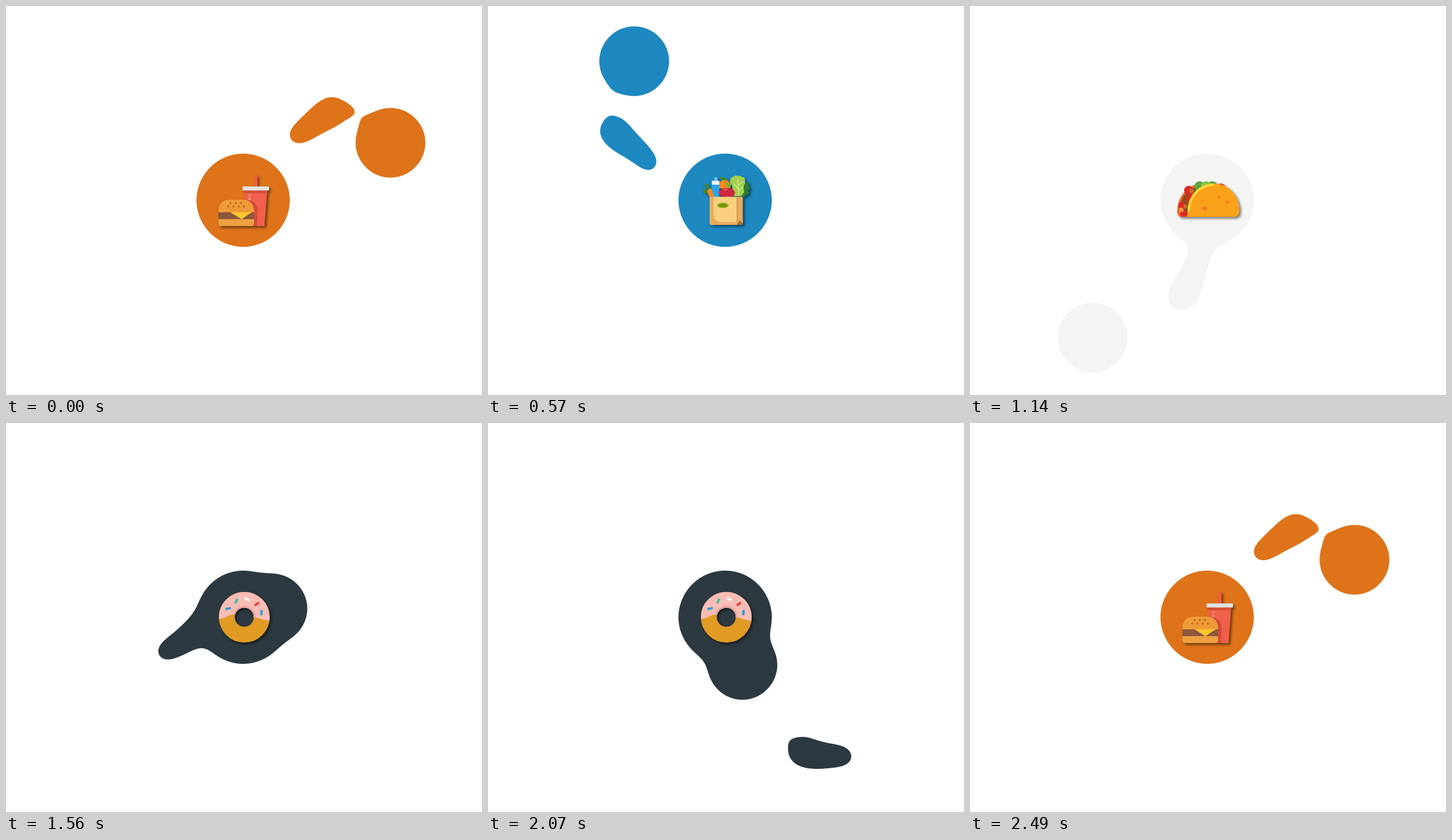
An HTML page for the animation above (2.52 s loop, 827 by 677 pixels).

```html
<!DOCTYPE html>
<html lang="en">
<head>
<meta charset="utf-8">
<title>Food loop</title>
<style>
html, body { margin: 0; width: 100%; height: 100%; overflow: hidden; background: #fff; }
svg { display: block; width: 100%; height: 100%; }
.icon { display: none; filter: drop-shadow(3px 3px 2px rgba(0, 0, 0, .5)); }
.icon.on { display: inline; }
</style>
</head>
<body>
<svg viewBox="0 0 827 677">
  <defs>
    <filter id="goo" filterUnits="userSpaceOnUse" x="0" y="0" width="827" height="677" color-interpolation-filters="sRGB">
      <feGaussianBlur stdDeviation="14"/>
      <feColorMatrix values="1 0 0 0 0  0 1 0 0 0  0 0 1 0 0  0 0 0 36 -13.9"/>
    </filter>
    <clipPath id="icing">
      <path d="M360 285H470V345Q452 345 440 340Q428 337 414 338Q396 329 384 337Q376 342 360 342Z"/>
    </clipPath>
    <clipPath id="shell">
      <path d="M378 358C378 329 399 309 424 309C450 309 468 331 468 356Q468 367 459 367H378Z"/>
    </clipPath>
  </defs>

  <g id="blob" filter="url(#goo)"><circle cx="412" cy="338" r="78.7"/></g>

  <g class="icon">
    <path fill="#f05a42" d="M432 294h5v20h-5z"/>
    <path fill="#f0604a" d="M414 320h40l-5 63h-31z"/>
    <path fill="#d64f3b" d="M414 321h39l-1 5h-37z"/>
    <path fill="#d24b3b" d="M420 337q14 3 17 14v9q-2 3 0 6q-2 3 0 6q-2 4 0 11h-17z"/>
    <path fill="#f79482" d="M421 328h4v3h-4zM421 334h4v4h-4z"/>
    <path fill="#e1e1df" d="M411 314h46v7h-46z"/>
    <path fill="#ef9a38" d="M369 360v-4q1-19 22-19h18q21 0 22 19v4z"/>
    <path fill="#8d583c" d="M369 359h62v12h-62z"/>
    <path fill="#fdc82e" d="M390 359h37l-18 12z"/>
    <path fill="#eda03f" d="M369 371h62v7q0 5-5 5h-52q-5 0-5-5z"/>
    <path stroke="#b8661f" stroke-width="3.4" stroke-linecap="round" d="M390 343h.1m9 0h.1m9 0h.1M386 349h.1m9 0h.1m9 0h.1m9 0h.1"/>
  </g>

  <g class="icon">
    <path stroke="#4c8a22" stroke-width="4" stroke-linecap="round" d="M387 322l-12-1M388 322l-10-11M386 323l-9 1M405 299l10 4"/>
    <path fill="#2f7b35" d="M440 331q3-24 14-25l-2 6l4 5l-4 4l2 5l-9 6z"/>
    <path fill="#f58a1f" d="M400 317q1-14 10-14q10 0 11 9v8zM381 322q3-6 9-3l13 13h-17q-5-4-5-10z"/>
    <path fill="#29a5ee" d="M389 306h13v26h-9l-4-12z"/>
    <path fill="#e9f5fd" d="M389 304h13v7h-13z"/>
    <path fill="#62bdf2" d="M393 298h6v6h-6z"/>
    <path fill="#a2cf4d" d="M427 331l-3-19l-4-5l2-8l8-4l8 1l8 3l1 9l-3 7l1 9l-5 7z"/>
    <path fill="none" stroke="#d4eb94" stroke-width="1.3" d="M436 331l-2-31m1 12l8-7m-7 16l8-7m-9 4l-8-9"/>
    <path fill="#7aae2e" d="M411 308l13 1l-5 8z"/>
    <ellipse cx="415" cy="325" rx="14" ry="8.5" fill="#d0273d"/>
    <path fill="#e96070" d="M409 320q5-4 8-1l-5 3z"/>
    <path fill="#e6ad60" d="M385 332h58v45l-4 4h-51q-3 0-3-4z"/>
    <path fill="#f8d07f" d="M392 332h40v44h-28q-12-2-12-14z"/>
    <path fill="#d3944b" d="M432 332h2v43l-2 2zM441 332h2v43h-2z"/>
    <path fill="#ad6e36" d="M432 381l5-8l6 5q0 3-4 3z"/>
    <ellipse cx="408" cy="347" rx="10" ry="4.6" fill="#8aaa12"/>
    <ellipse cx="408" cy="347" rx="7" ry="2.4" fill="#6f950c"/>
  </g>

  <g class="icon">
    <path fill="#f2661f" d="M360 358C360 330 380 309 405 309V367H367Q360 366 360 358Z"/>
    <path fill="#8f4c1f" d="M365 350q4-30 30-35l4 10l-22 40h-8z"/>
    <g fill="#dc2a26"><circle cx="380" cy="321" r="8"/><circle cx="384" cy="336" r="8"/><circle cx="368" cy="347" r="6"/><circle cx="371" cy="361" r="6"/><circle cx="436" cy="317" r="8"/></g>
    <g fill="#c4702c"><circle cx="385" cy="322" r="4"/><circle cx="374" cy="349" r="3.5"/></g>
    <circle cx="367" cy="355" r="4" fill="#f69a3c"/>
    <g fill="#58a744"><circle cx="399" cy="314" r="9"/><circle cx="421" cy="314" r="9"/></g>
    <circle cx="410" cy="314" r="9" fill="#8ac441"/>
    <g clip-path="url(#shell)">
      <path fill="#faa21b" d="M370 300h110v70H370z"/>
      <path fill="none" stroke="#fdd835" stroke-width="8" d="M378 359C378 329 399 309 424 309"/>
    </g>
    <g fill="#f47c20"><ellipse cx="408" cy="352" rx="4.5" ry="3.5"/><circle cx="432" cy="333" r="2.7"/><circle cx="447" cy="341" r="2.7"/><circle cx="403" cy="339" r="1.7"/></g>
  </g>

  <g class="icon" fill="none">
    <circle cx="414" cy="338" r="30.3" stroke="#e19a22" stroke-width="27.6"/>
    <g clip-path="url(#icing)">
      <circle cx="414" cy="338" r="30.3" stroke="#f8bdb6" stroke-width="27.6"/>
      <circle cx="414" cy="338" r="18" stroke="#e6a29d" stroke-width="3"/>
    </g>
    <g stroke-width="4.2">
      <path stroke="#2b9bd0" d="M381.500 324l9-2M443.500 334.500l.5-9"/>
      <path stroke="#4fb99a" d="M398 314l4-8"/>
      <path stroke="#fff" d="M415 304.500l8 4.500"/>
      <path stroke="#e0453f" d="M432 317.500l7.500-5"/>
    </g>
  </g>
</svg>
<script>
const STEP = 30, LOOP = 2520, LAP = 2490;

// Time, x, y of the ball on its four-leaf course.
const course = [
  [0, 668, 238], [30, 655, 275], [75, 605, 319], [145, 537, 337], [270, 412, 342],
  [305, 376, 368], [340, 325, 332], [375, 276, 268], [445, 219, 217], [485, 203, 168],
  [540, 228, 113], [570, 254, 96], [610, 288, 83], [660, 312, 98], [710, 345, 150],
  [770, 395, 235], [830, 435, 300], [885, 451, 350], [945, 402, 428], [1015, 368, 506],
  [1080, 297, 573], [1140, 213, 577], [1195, 163, 545], [1250, 175, 490], [1320, 235, 425],
  [1400, 315, 375], [1470, 380, 322], [1520, 425, 300], [1575, 476, 335], [1645, 528, 395],
  [1700, 585, 460], [1770, 640, 562], [1805, 659, 577], [1840, 645, 583], [1875, 617, 580],
  [1945, 546, 571], [2010, 487, 510], [2070, 442, 421], [2130, 353, 345], [2160, 372, 303],
  [2210, 430, 270], [2295, 508, 224], [2365, 567, 183], [2400, 600, 181], [2445, 648, 195]
];

const scenes = [[300, '#de731a', 0], [900, '#1e88c0', 1], [1530, '#f4f4f4', 2], [2130, '#2c3940', 3], [LOOP, '#de731a', 0]];

const blob = document.getElementById('blob');
const icons = document.querySelectorAll('.icon');

function knot(i) {
  const n = course.length, k = (i + n) % n, [t, x, y] = course[k];
  return [t + Math.floor(i / n) * LAP, x, y];
}

// Smooth curve through the timed points.
function place(time) {
  const t = ((time % LAP) + LAP) % LAP;
  let i = course.length - 1;
  while (course[i][0] > t) i--;
  const [a, b, c, d] = [i - 1, i, i + 1, i + 2].map(knot);
  const h = c[0] - b[0], u = (t - b[0]) / h, u2 = u * u, u3 = u2 * u;
  return [1, 2].map(k => {
    const m = (c[k] - a[k]) / (c[0] - a[0]) * h;
    const n = (d[k] - b[k]) / (d[0] - b[0]) * h;
    return (2 * u3 - 3 * u2 + 1) * b[k] + (u3 - 2 * u2 + u) * m + (3 * u2 - 2 * u3) * c[k] + (u3 - u2) * n;
  });
}

function addDrop(lag, r) {
  const el = document.createElementNS('http://www.w3.org/2000/svg', 'circle');
  el.setAttribute('r', r);
  blob.append(el);
  return { el, lag };
}

const drops = [addDrop(0, 58.6), addDrop(85, 11)];
for (let i = 0; i < 9; i++) drops.push(addDrop(125 + i * 9.4, 24.5 - i * 1.3));

function draw(now) {
  const t = Math.floor((now % LOOP) / STEP) * STEP;
  const [, color, icon] = scenes.find(s => t < s[0]);
  blob.setAttribute('fill', color);
  icons.forEach((el, i) => el.classList.toggle('on', i === icon));
  for (const { el, lag } of drops) {
    const [x, y] = place(t - lag);
    el.setAttribute('cx', x.toFixed(2));
    el.setAttribute('cy', y.toFixed(2));
  }
}

let start;
function tick(now) {
  start ??= now;
  draw(now - start);
  requestAnimationFrame(tick);
}
draw(0);
requestAnimationFrame(tick);
</script>
</body>
</html>
```
